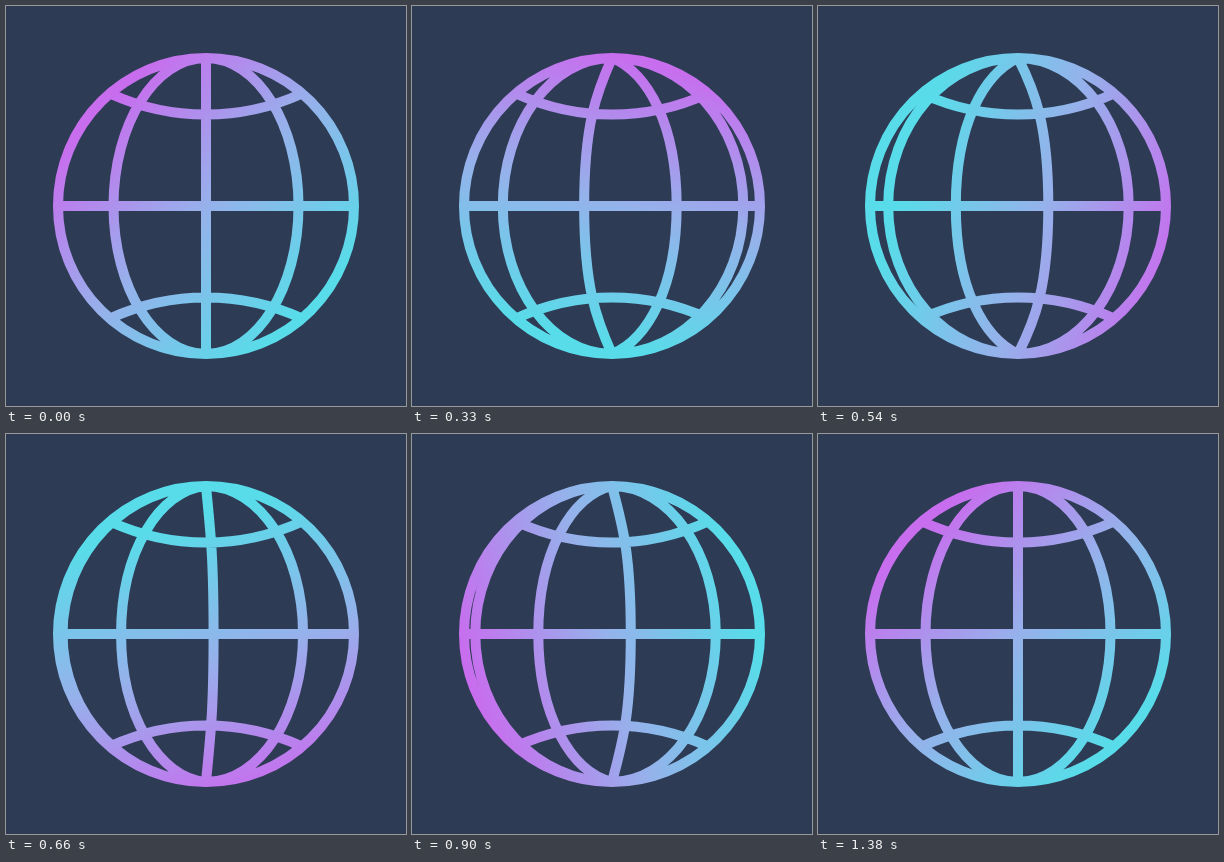
Recreate the animation shown at these times as an HTML page with a canvas. Size 400 by 400 pixels, loop 3410 ms.

```html
<!DOCTYPE html>
<html lang="en">
<head>
<meta charset="utf-8">
<title>Spinning globe</title>
<style>
html, body { margin: 0; width: 100%; height: 100%; overflow: hidden; background: #2d3b55; }
canvas { display: block; width: 400px; height: 400px; }
</style>
</head>
<body>
<canvas id="stage" width="400" height="400"></canvas>
<script>
const ctx = document.getElementById('stage').getContext('2d');
const LOOP = 3410, SPIN = 1350, TURN = 1380, STEP = 30;
const C = 200, R = 148, K = 0.5523;
const SHIFTS = 7;                      // meridian shifts per spin
const COLORS = ['#c86dee', '#96b1eb', '#58dce9'];

// Meridian poses: equator offset and vertical pole handle
const POSES = [[-R, 0], [-92.5, 0], [0, 49], [92.5, 0], [R, 0]];

const mix = (a, b, f) => a + (b - a) * f;

// Ease with control points (x1, 0) and (x2, 1)
function ease(x, x1, x2) {
  if (x >= 1) return 1;
  let lo = 0, hi = 1, u = x;
  for (let i = 0; i < 30; i++) {
    u = (lo + hi) / 2;
    const v = 1 - u;
    if (3 * u * v * v * x1 + 3 * u * u * v * x2 + u * u * u < x) lo = u;
    else hi = u;
  }
  return u * u * (3 - 2 * u);
}

function meridian(x, h) {
  ctx.moveTo(0, -R);
  ctx.bezierCurveTo(K * x, h - R, x, -K * R, x, 0);
  ctx.bezierCurveTo(x, K * R, K * x, R - h, 0, R);
}

function parallel(side) {
  const r = 230, half = Math.asin(95 / r), mid = side * Math.PI / 2;
  const cy = -side * (91.5 + r);
  ctx.moveTo(r * Math.cos(mid - half), cy + r * Math.sin(mid - half));
  ctx.arc(0, cy, r, mid - half, mid + half);
}

// Rotating gradient that drifts towards its first colour in mid-turn
function paint(turn) {
  const angle = Math.PI * (2 * turn - 0.75);
  const drift = 14 * (1 - Math.cos(2 * Math.PI * turn));
  const x = Math.cos(angle), y = Math.sin(angle);
  const a = drift + 142, b = drift - 142;
  const fill = ctx.createLinearGradient(a * x, a * y, b * x, b * y);
  COLORS.forEach((c, i) => fill.addColorStop(i / 2, c));
  return fill;
}

function draw(ms) {
  const shift = SHIFTS * ease(ms / SPIN, 0.0935, 0.417) % 1;

  ctx.setTransform(1, 0, 0, 1, 0, 0);
  ctx.fillStyle = '#2d3b55';
  ctx.fillRect(0, 0, 400, 400);
  ctx.translate(C, C);
  ctx.strokeStyle = paint(ease(ms / TURN, 0.36, 0.46));
  ctx.lineWidth = 10;

  ctx.beginPath();
  ctx.arc(0, 0, R, 0, 2 * Math.PI);
  ctx.moveTo(-R, 0);
  ctx.lineTo(R, 0);
  parallel(1);
  parallel(-1);
  for (let i = 0; i < 4; i++) {
    const [x0, h0] = POSES[i], [x1, h1] = POSES[i + 1];
    meridian(mix(x0, x1, shift), mix(h0, h1, shift));
  }
  ctx.stroke();
}

let start;
function tick(now) {
  start ??= now;
  const t = (now - start) % LOOP;
  draw(Math.floor(t / STEP) * STEP);
  requestAnimationFrame(tick);
}
draw(0);
requestAnimationFrame(tick);
</script>
</body>
</html>
```
